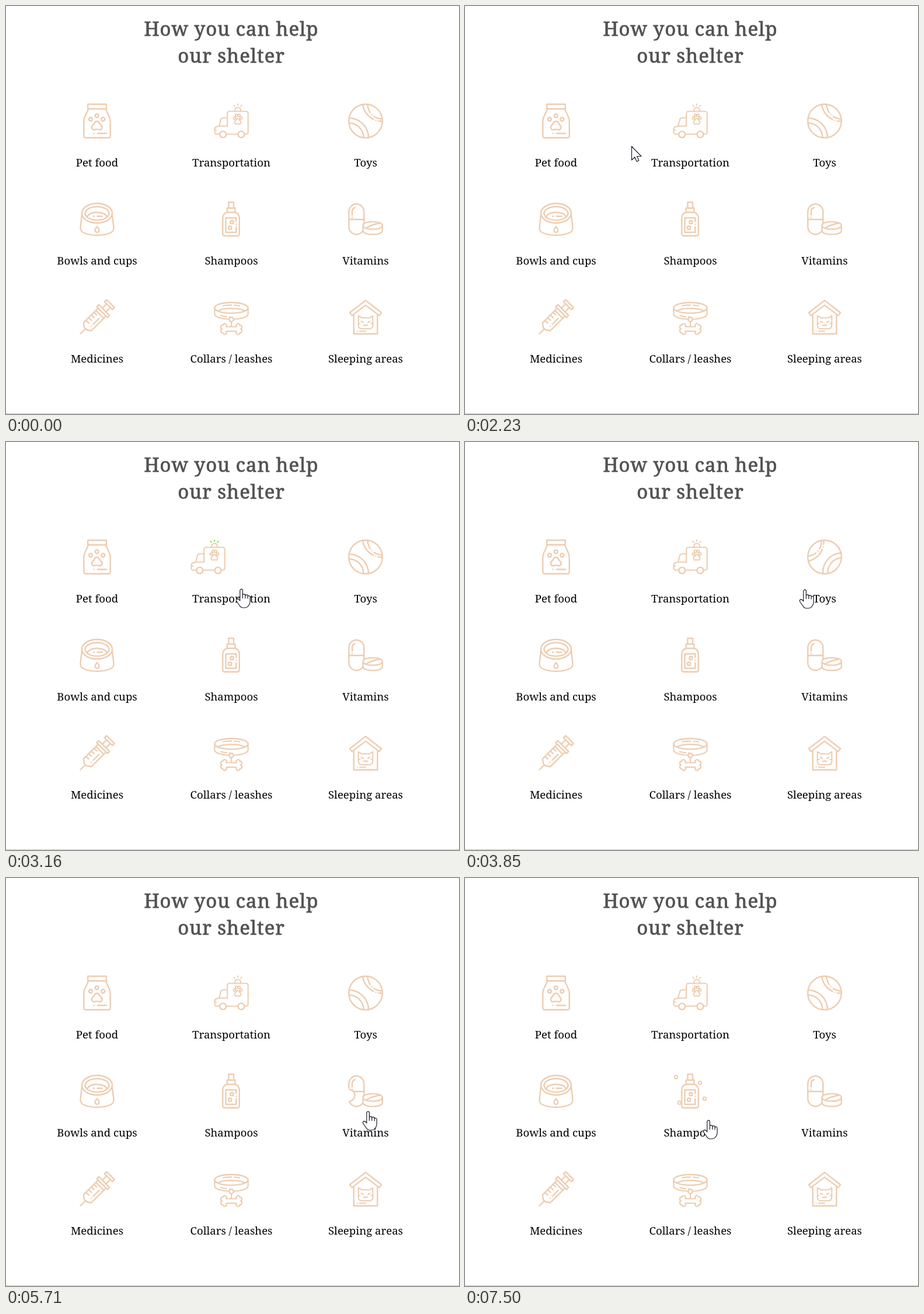
An HTML page that plays this animation: 776 px wide and 699 px high, repeating every 8000 ms.

```html
<!DOCTYPE html>
<html lang="en">
<head>
<meta charset="utf-8">
<title>How you can help our shelter</title>
<style>
  html, body { margin: 0; width: 100%; height: 100%; overflow: hidden; background: #fff; }
  svg { display: block; }
  text { font-family: "Noto Serif", serif; text-anchor: middle; }
  .title { font-size: 33px; letter-spacing: 1px; fill: #525252; stroke: #525252; stroke-width: .8; }
  .label { font-size: 18.6px; fill: #000; }
  .icon { fill: none; stroke: #edcdb1; stroke-width: 2.4; stroke-linecap: round; stroke-linejoin: round; }
  .solid { fill: #fff; }
  .cursor { fill: #fff; stroke: #1c1c2b; stroke-width: 1.2; stroke-linejoin: round; }
</style>
</head>
<body>
<svg id="stage" width="776" height="699" viewBox="0 0 776 699">
  <text class="title" x="386" y="51">How you can help</text>
  <text class="title" x="386" y="97">our shelter</text>
  <g id="grid"></g>
  <path d="M0 698.5H776" stroke="#c3c3c3"/>
  <g id="cursor" class="cursor">
    <path id="arrow" d="M.5 .5V24L5.8 19L9.2 26.5L12.8 25L9.6 17.5H17Z"/>
    <g id="hand">
      <path d="M-2.2 17V1.5a2.3 2.3 0 0 1 4.6 0V9.5a2.2 2.2 0 0 1 4.4 .8a2.2 2.2 0 0 1 4.3 1a2.2 2.2 0 0 1 4 1.4V19Q15 25 12.3 27.5Q10.5 31 4 31Q-1 31-3 27L-8.2 19.5Q-9.5 16-6.5 15.6Q-4 15.6-2.2 19Z"/>
      <path d="M2.4 9.5V15M6.8 10.3V15M11.1 11.5V15.5" fill="none"/>
    </g>
  </g>
</svg>
<script>
const LOOP = 8000, STEP = 77.6, FIRST = 280;
const COLUMNS = [156, 386, 616], ROWS = [167, 335, 503];

const path = (d, more = '') => `<path d="${d}" ${more}/>`;
const circle = (x, y, r) => `<circle cx="${x}" cy="${y}" r="${r}"/>`;
const ellipse = (x, y, rx, ry) => `<ellipse cx="${x}" cy="${y}" rx="${rx}" ry="${ry}"/>`;
const circles = (r, points) => points.map(([x, y]) => circle(x, y, r)).join('');
const dashed = (d, dashes) => path(d, `pathLength="100" stroke-dasharray="${dashes}"`);

const items = [
  ['Pet food',
    path('M14.2 1.3H45.8V9.3H14.2ZM15 9.3C12.5 18 7.3 22 7.3 31V55.7a3 3 0 0 0 3 3H49.7a3 3 0 0 0 3-3V31C52.7 22 47.5 18 45 9.3M24.5 51.2h.1M31 51.2H46') +
    `<g id="paw">${circles(3, [[19, 27], [29.7, 21], [40.3, 27]])}` +
    path('M29.7 30.5C25.5 30.5 25.5 35 22.8 37C18.5 41 22 46 26 44.8Q29.7 43.5 33.4 44.8C37.4 46 41 41 36.6 37C34 35 34 30.5 29.7 30.5Z') + '</g>'],

  ['Transportation',
    '<g id="van">' +
    path('M23.2 39V17a3.5 3.5 0 0 1 3.5-3.5H55.2a3.5 3.5 0 0 1 3.5 3.5V49.5a3 3 0 0 1-3 3H53M41 52.5H22M9.7 52.5H4.5a3 3 0 0 1-3-3V44q0-3 3-4L9 38.7L12 27.5q1-3 4-3H23M9 38.7H23M2 45.5h2.5M36.3 13V11.5a4.8 4.8 0 0 1 9.6 0V13', 'stroke-width="2.1"') +
    circles(5.4, [[15.7, 53], [47, 53]]) +
    `<g stroke-width="1.9">${circles(2.1, [[35.5, 25], [38.7, 20.3], [43.3, 20.3], [46.5, 25]])}` +
    path('M41 25.5Q38.8 26 37.8 28.7C33.5 31.5 36 36 39 35.2Q41 34.5 43 35.2C46 36 48.5 31.5 44.2 28.7Q43.2 26 41 25.5Z') + '</g>' +
    path('M41 .9V3M34.2 3.2L36 4.7M47.8 3.2L46 4.7', 'id="rays" stroke-width="2"') + '</g>'],

  ['Toys',
    `<g id="ball">${circle(30, 30, 28.8)}` +
    path('M1.6 25A33.5 33.5 0 0 1 35 58.4M1.6 33.5A25 25 0 0 1 26.5 58.4') +
    dashed('M25 1.6A33.5 33.5 0 0 0 58.4 30.5', '68 9 .1 9 100') +
    dashed('M33.5 1.6A25 25 0 0 0 58.4 26.5', '38 12 .1 12 100') + '</g>'],

  ['Bowls and cups',
    ellipse(30, 20, 26, 16.8) + ellipse(30, 20.3, 20.5, 11.6) +
    path('M13 26Q17 18.5 30 18.5Q43 18.5 47 26M24 25.2h1.2M30.5 25.2H39M4.2 21L1.6 43Q.6 50 6 53Q16 57.8 30 57.8Q44 57.8 54 53Q59.4 50 58.4 43L55.8 21M30 43q-3.5 4-3.5 6.3a3.5 3.5 0 0 0 7 0q0-2.3-3.5-6.3Z')],

  ['Shampoos',
    path('M25.4 11.2V1.3H34V11.2M22.7 11.3H36.5V18.5H22.7ZM22.7 18.5Q15.3 20.5 15.3 29V55.7a3 3 0 0 0 3 3H40.8a3 3 0 0 0 3-3V29Q43.8 20.5 36.5 18.5M38.3 43.5V52.7H20.5V28H38.3V34M38.3 38.8v.1') +
    circles(2.7, [[31, 35.2], [27.6, 45]]) +
    `<g id="bubbles" stroke-width="2">${circles(2.7, [[5.5, 6], [46.5, 16], [54.5, 43], [11.2, 50]])}</g>`],

  ['Vitamins',
    '<rect x="1.3" y="4.3" width="26" height="52" rx="13"/>' +
    path('M1.3 30.8H27.3M7 23V17.5q0-5.5 4.5-7M7 27.3v.1') +
    `<g id="bite">${path('M-4 25.5H2.2C8 28 11.5 32.5 11.5 37.5C11.3 43 7 47.5 1.7 48.5H-4Z', 'class="solid" stroke="none"')}` +
    path('M2.2 27C8 28.5 11.5 32.5 11.5 37.5C11.3 43 7 47 2 48') + '</g>' +
    path('M25.5 41V50C25.5 58.5 58.8 58.5 58.8 50V41C58.8 32.5 25.5 32.5 25.5 41C25.5 49.5 58.8 49.5 58.8 41M32 44.7Q42 39 54 37.3', 'class="solid"')],

  ['Medicines',
    path('M0 0H12M12-2.5L17-9.5H52.5V9.5H17L12 2.5ZM52.5-13H57.5V13H52.5ZM57.5-4.5H68M57.5 4.5H68M68-9.5H73V9.5H68ZM23-9.5V-3M29.5-9.5V-3M36-9.5V-3M42.5-9.5V-3M22 4h.1M27 4H41M47-9.5V9.5', 'transform="translate(1.5 58.5) rotate(-45)"')],

  ['Collars / leashes',
    ellipse(30, 14.2, 28.6, 9.2) +
    path('M7 19.3Q14 15.2 30 15.2Q46 15.2 53 19.3M16 10.5Q23 9.4 30 9.4M35 9.5Q40 9.8 44 10.5M1.4 14.2V24.5C1.4 29.5 12 33 25.5 33.5M58.6 14.2V24.5C58.6 29.5 48 33 34.5 33.5M12 27.5Q17 28.9 22 29.4M27 29.7h.1', 'stroke-width="2.2"') +
    circle(30, 34, 3.7) +
    path('M30 38V46M21.5 46.5H38.5C37 41 43.5 39 44.5 43.7C49 44 49 49 46 50.3C49 51.7 49 56.5 44.5 57C43.5 61.5 37 60 38.5 54.2H21.5C23 60 16.5 61.5 15.5 57C11 56.5 11 51.7 14 50.3C11 49 11 44 15.5 43.7C16.5 39 23 41 21.5 46.5Z', 'stroke-width="2.2"')],

  ['Sleeping areas',
    path('M30 1.4L3 22.3L6.6 27.4L30 9.6L53.4 27.4L57 22.3ZM9.7 26V58.7H50.3V26') +
    path('M17.7 27.5L23 31.2H37L42.3 27.5V44Q42.3 50 36 50H24Q17.7 50 17.7 44ZM22.5 37.3L26 39M37.5 37.3L34 39M26.5 43.5Q28.7 45.5 30 43Q31.3 45.5 33.5 43.5M17.5 41H20.5M39.5 41H42.5M15.5 54h.1M20 54H30', 'stroke-width="2.1"')]
];

const $ = id => document.getElementById(id);
$('grid').innerHTML = items.map(([label, art], i) => {
  const x = COLUMNS[i % 3], y = ROWS[Math.floor(i / 3)];
  return `<g class="icon" transform="translate(${x - 30} ${y})">${art}</g>` +
    `<text class="label" x="${x}" y="${y + 108}">${label}</text>`;
}).join('');

// Pointer path: time, x, y
const route = [
  [280, 507, 680], [510, 405, 520], [820, 215, 300], [1060, 163, 231], [1130, 159, 228],
  [1700, 159, 228], [1840, 163, 228], [1915, 163, 228], [2220, 285, 240], [2540, 355, 247],
  [2770, 374, 248], [2930, 390, 250], [3090, 390, 250], [3150, 403, 253], [3500, 500, 256],
  [3849, 582, 254], [3930, 588, 253], [4240, 595, 250], [5015, 595, 250], [5400, 612, 330],
  [5710, 620, 401], [6565, 620, 401], [7030, 485, 410], [7420, 423, 415], [7495, 417, 416]
];

const clamp = v => Math.max(0, Math.min(1, v));

function pointerAt(t) {
  const next = route.findIndex(p => p[0] > t);
  if (next < 0) return route[route.length - 1].slice(1);
  const a = route[Math.max(0, next - 1)], b = route[next];
  const k = clamp((t - a[0]) / (b[0] - a[0] || 1));
  return [a[1] + (b[1] - a[1]) * k, a[2] + (b[2] - a[2]) * k];
}

function cellAt(x, y) {
  const column = COLUMNS.findIndex(c => Math.abs(x - c) < 90);
  const row = ROWS.findIndex(r => y >= r && y < r + 115);
  return column < 0 || row < 0 ? -1 : row * 3 + column;
}

// CSS "ease" timing, cubic-bezier(.25, .1, .25, 1)
function ease(v) {
  const bezier = (a, b, s) => 3 * a * s * (1 - s) ** 2 + 3 * b * s * s * (1 - s) + s ** 3;
  const goal = clamp(v);
  let low = 0, high = 1;
  for (let i = 0; i < 20; i++) {
    const mid = (low + high) / 2;
    if (bezier(.25, .25, mid) < goal) low = mid; else high = mid;
  }
  return bezier(.1, 1, high);
}

const progress = (t, from, length) => ease((t - from) / length);
const show = (id, on) => $(id).setAttribute('visibility', on ? 'visible' : 'hidden');

function draw(time) {
  const t = FIRST + Math.floor((time - FIRST + 5) / STEP) * STEP;
  const [x, y] = pointerAt(t);
  const visible = t >= FIRST;
  const cell = visible ? cellAt(x, y) : -1;

  $('cursor').setAttribute('transform', `translate(${Math.round(x)} ${Math.round(y)})`);
  show('arrow', visible && cell < 0);
  show('hand', cell >= 0);

  $('paw').setAttribute('fill', cell === 0 ? '#edcdb1' : 'none');
  const drive = progress(t, 2280, 400) - progress(t, 3420, 400);
  $('van').setAttribute('transform', `translate(${-40 * drive} 0)`);
  $('rays').setAttribute('stroke', cell === 1 ? '#86ea3c' : '#edcdb1');
  $('ball').setAttribute('transform', `rotate(${360 * progress(t, 3540, 700)} 30 30)`);
  show('bite', cell === 5);
  show('bubbles', cell === 4);
}

const start = performance.now();
function tick() {
  draw((performance.now() - start) % LOOP);
  requestAnimationFrame(tick);
}
tick();
</script>
</body>
</html>
```
